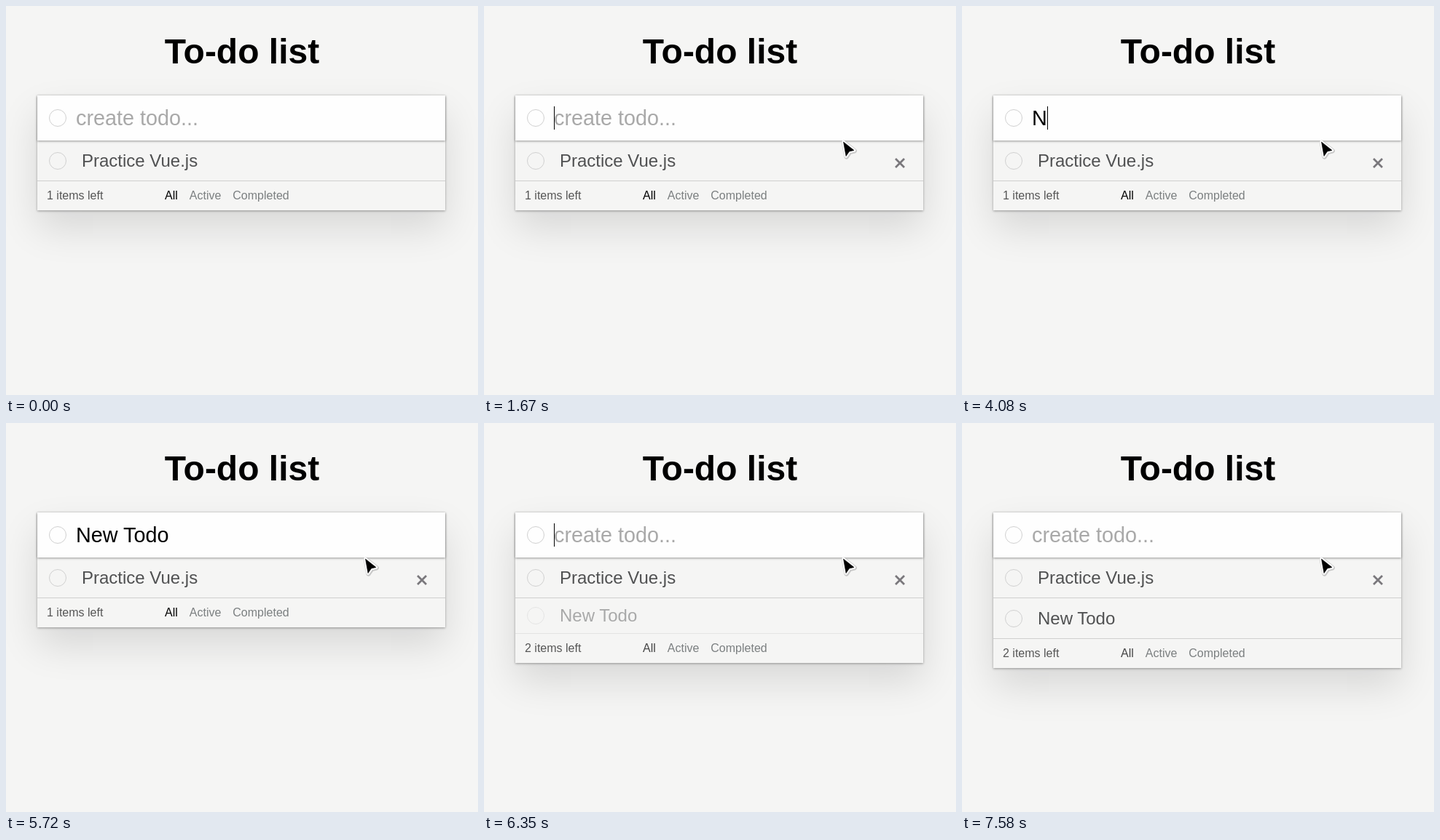
An HTML page for the animation above (8 s loop, 648 by 535 pixels).

```html
<!DOCTYPE html>
<html lang="en">
<head>
<meta charset="utf-8">
<title>To-do list</title>
<style>
html, body { margin: 0; width: 100%; height: 100%; overflow: hidden; background: #f5f5f4; }
body { position: relative; font: 24px "Liberation Sans", Arial, sans-serif; color: #505152; }
body *, body svg { box-sizing: border-box; }
h1 { position: absolute; left: 0; top: 35px; width: 648px; margin: 0; font-size: 48px; line-height: 56px; text-align: center; color: #000; }
#card { position: absolute; left: 43px; top: 123px; width: 560px; height: 158px; background: #f5f5f4;
  box-shadow: 0 1px 3px rgba(0,0,0,.35), 0 25px 50px rgba(0,0,0,.12); }
#card div { position: absolute; left: 0; width: 560px; white-space: pre; }
#card span { position: absolute; }
#entry { top: 0; height: 62px; background: #fefefe; font-size: 28.8px; line-height: 62px; color: #000;
  box-shadow: 0 1px 3px rgba(0,0,0,.4); z-index: 1; }
#entry span { left: 53px; }
#hint { color: #a9a9a9; }
#entry .jamo { font-family: "Noto Sans CJK KR", "Noto Sans CJK", sans-serif; letter-spacing: .08em; }
#comp { text-decoration: underline 1px; text-underline-offset: 6px; }
#caret { width: 1px; height: 32px; background: #000; }
.row { height: 56px; border-bottom: 1px solid #cfcfcf; overflow: hidden; }
.row span { left: 61px; top: 50%; line-height: 56px; margin-top: -28px; }
.ring { position: absolute; left: 16px; top: 50%; width: 24px; height: 24px; margin-top: -12px; border: 1px solid #d0d0d0; border-radius: 50%; }
#foot { height: 41px; font-size: 16px; line-height: 41px; color: #7b7f80; }
svg { position: absolute; left: 0; top: 0; width: 648px; height: 535px; z-index: 2; }
</style>
</head>
<body>
<h1>To-do list</h1>
<div id="card">
  <div id="entry"><i class="ring"></i><span id="hint">create todo...</span><span id="done"></span><span id="comp" class="jamo"></span><span id="caret"></span></div>
  <div class="row" style="top:62px"><i class="ring"></i><span>Practice Vue.js</span></div>
  <div class="row" id="added" style="top:118px"><i class="ring"></i><span>New Todo</span></div>
  <div id="foot"><span id="count" style="left:13px;color:#565656"></span><span id="all" style="left:175px">All</span><span style="left:208.8px">Active</span><span style="left:268.3px">Completed</span></div>
</div>
<svg viewBox="0 0 648 535" fill="none" stroke-linejoin="round">
  <defs>
    <path id="tip" d="M1.5 0L16 11.5L9.5 13L5 19.5Z"/>
    <path id="bar" d="M-5 -9H5M-5 9H5M0 -9V9" transform="rotate(-5)"/>
  </defs>
  <path id="remove" d="M565 210L577 222M577 210L565 222" stroke="#7a787c" stroke-width="2.8"/>
  <g id="arrow">
    <use href="#tip" stroke="#aaa" stroke-width="6.5" opacity=".6" x=".6" y=".8"/>
    <use href="#tip" stroke="#fff" stroke-width="4.5"/>
    <use href="#tip" fill="#000" stroke="#000" stroke-width=".6"/>
  </g>
  <g id="beam" stroke-linecap="round">
    <use href="#bar" stroke="#b5b5b5" stroke-width="9"/>
    <use href="#bar" stroke="#f4f4f4" stroke-width="6.5"/>
    <use href="#bar" stroke="#000" stroke-width="3"/>
  </g>
</svg>
<script>
const $ = id => document.getElementById(id);
const show = (id, on) => $(id).style.display = on ? '' : 'none';

// time, finished text, character still being composed
const typing = [
  [0, ''], [2920, '', 'ㅜ'], [3150, 'ㅜ', 'ㄷ'], [3300, 'ㅜㄷ', 'ㅈ'], [3530, 'ㅜㄷ'], [3700, 'ㅜ'], [3850, ''],
  [4080, 'N'], [4250, 'Ne'], [4320, 'New'], [4490, 'New '], [4790, 'New T'],
  [4960, 'New To'], [5110, 'New Tod'], [5190, 'New Todo'], [6120, '']
];
const blinks = [670, 1210, 1670, 2220, 2750, 5720, 6120, 7580];

// index of the held step since start
const step = (t, start, gap, last) => Math.min(last, Math.floor((t - start) / gap + .01));
const mix = (a, b, u) => a + (b - a) * u;
const easeOut = u => 1 - (1 - u) ** 2;

function pointer(t) {
  if (t < 820) {
    const u = easeOut(step(t, 70, 73.3, 6) / 6);
    return [mix(205, 308, u), mix(520, 150, u)];
  }
  const u = easeOut(step(t, 820, 78, 5) / 5);
  return [mix(310.5, 492, u), mix(158, 187, u)];
}

function drawEntry(t) {
  const [, text, comp = ''] = typing.findLast(e => e[0] <= t);
  const jamo = comp || /[ㄱ-ㅣ]/.test(text);
  $('done').className = jamo ? 'jamo' : '';
  $('done').textContent = text;
  $('comp').textContent = comp;
  show('hint', !text && !comp);
  const width = $('done').getBoundingClientRect().width;
  $('comp').style.left = 53 + width + 'px';
  $('caret').style.left = 53 + Math.round(width) + 'px';
  $('caret').style.top = (jamo ? 17 : 15) + 'px';
  show('caret', blinks.filter(b => b <= t).length % 2);
}

function drawList(t) {
  const added = t >= 6120;
  const p = t >= 6740 ? 1 : added ? step(t, 6120, 76.6, 6) * .153 : 0;
  const h = Math.round(56 * (1 - (1 - p) ** 3.37));
  show('added', h);
  $('added').style.height = h + 'px';
  $('added').style.opacity = p;
  $('foot').style.top = 117 + h + 'px';
  $('card').style.height = 158 + h + 'px';
  $('count').textContent = (added ? 2 : 1) + ' items left';
  $('all').style.color = added ? '#444' : '#000';
}

function drawPointer(t) {
  const [x, y] = pointer(t), shown = t >= 70, inEntry = y < 186;
  show('beam', shown && inEntry);
  show('arrow', shown && !inEntry);
  show('remove', shown && !inEntry && y < 241);
  for (const id of ['beam', 'arrow']) $(id).setAttribute('transform', `translate(${x} ${y})`);
}

const start = performance.now();
function frame() {
  const t = (performance.now() - start) % 8000;
  drawEntry(t);
  drawList(t);
  drawPointer(t);
  requestAnimationFrame(frame);
}
frame();
</script>
</body>
</html>
```
